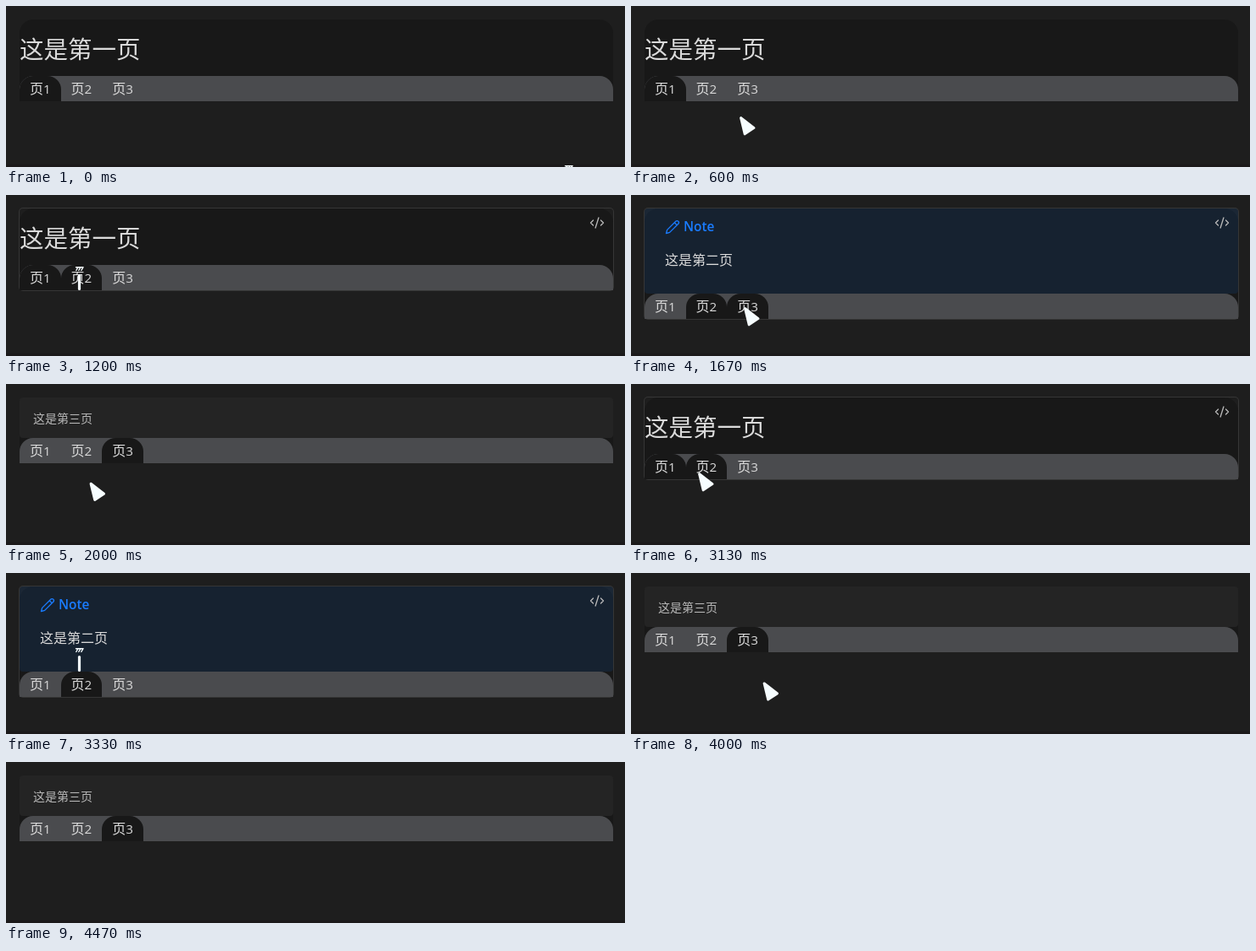
An HTML page for the animation above (5200 ms loop, 730 by 191 pixels).

```html
<!DOCTYPE html>
<html lang="zh-CN">
<head>
<meta charset="utf-8">
<title>Tabs</title>
<style>
  html, body { margin: 0; width: 100%; height: 100%; overflow: hidden; background: #1e1e1e; }
  body {
    position: relative; color: #dadada;
    font: 16px/24px "Open Sans", "Noto Sans CJK SC", "Noto Sans CJK", sans-serif;
  }
  body * { box-sizing: border-box; }
  #floor { position: absolute; left: 0; right: 0; top: 188px; height: 3px; background: #1b191a; }
  #box { position: absolute; left: 16px; top: 16px; width: 700px; border-radius: 4px; }
  #box.hover { box-shadow: 0 0 0 1px #363636; }
  #back { position: absolute; inset: 0; background: #181818; border-radius: 16px 16px 0 0; }
  .page { position: absolute; left: 0; top: 0; width: 100%; white-space: nowrap; }
  .page > * { position: absolute; }
  #p0 { height: 67px; }
  #p0 b { left: 0; top: 15px; font-size: 28.5px; line-height: 40px; font-weight: 500; }
  #p1 { height: 101px; background: rgba(2, 122, 255, .1); border-radius: 4px; }
  #p1 svg { left: 24px; top: 13px; }
  #p1 b { left: 46px; top: 10px; font-size: 15.4px; font-weight: 600; color: #1a7cff; }
  #p1 span { left: 24px; top: 49px; }
  #p2 { height: 48px; background: #242424; border-radius: 4px; }
  #p2 span { left: 16px; top: 13px; font-size: 14px; font-weight: 300; color: #b8b8b8; }
  #bar {
    position: absolute; left: 0; bottom: 0; width: 100%; height: 30px;
    background: #4a4b4e; border-radius: 16px 16px 0 0; overflow: hidden;
  }
  .tab {
    position: absolute; top: 0; width: 48.6px; height: 30px; padding-left: 12px;
    line-height: 30px; font-size: 16px; white-space: nowrap; border-radius: 16px 16px 0 0;
  }
  .tab i { font-style: normal; font-size: 15.2px; }
  .tab.on { background: #181818; }
  #code { position: absolute; right: 10px; top: 8px; }
  svg { display: block; fill: none; stroke-linecap: round; stroke-linejoin: round; }
  #mouse { position: absolute; left: 0; top: 0; width: 100%; height: 100%; }
</style>
</head>
<body>
<div id="floor"></div>
<div id="box">
  <div id="back"></div>
  <div class="page" id="p0"><b>这是第一页</b></div>
  <div class="page" id="p1">
    <svg width="18" height="18" viewBox="0 0 24 24" stroke="#1a7cff" stroke-width="1.75">
      <path d="M17 3a2.8 2.8 0 1 1 4 4L7.500 20.500 2 22l1.500-5.500ZM15 5l4 4"/>
    </svg>
    <b>Note</b><span>这是第二页</span>
  </div>
  <div class="page" id="p2"><span>这是第三页</span></div>
  <div id="bar"></div>
  <svg id="code" width="18" height="18" viewBox="0 0 24 24" stroke="#bababa" stroke-width="1.75">
    <path d="M18 16l4-4-4-4M6 8l-4 4 4 4M14.500 4l-5 16"/>
  </svg>
</div>
<svg id="mouse" viewBox="0 0 730 191">
  <path id="arrow" d="M1.600 1.600L17 13.600 6.200 20.800Z" fill="#f6fdff" stroke="#f6fdff" stroke-width="3"/>
  <g id="beam" stroke="#f6fdff">
    <path d="M7.500-5.500V10.500" stroke-width="3.200"/>
    <path d="M3.500-15.300H12M6-15.300L3.800-11.500M9-15.300L6.800-11.500M12-15.300L9.800-11.500" stroke-width="1.400"/>
  </g>
</svg>
<script>
  const LOOP = 5200, FPS = 15, TAB = 48.6;
  const $ = id => document.getElementById(id);
  const smooth = u => u * u * (3 - 2 * u);
  const linear = u => u;

  // pointer stops: step, x, y, easing towards the stop
  const stops = [
    [2, 656, 205], [9, 128, 131, smooth],
    [10, 128, 131], [16, 79, 101, smooth],
    [18, 79, 101], [25, 133, 133, smooth],
    [27, 133, 133], [35, 41, 89.5, linear], [38, 44, 85, smooth],
    [41, 44, 85], [47, 79, 105, smooth],
    [50, 79, 105], [56, 133, 125, smooth],
    [59, 133, 125], [67, 656, 225, smooth]
  ];
  // step, page shown from then on
  const views = [[0, 0], [19, 1], [28, 2], [42, 0], [50, 1], [60, 2]];
  const heights = [67, 101, 48];
  const PRESS = 18;

  const tabs = [1, 2, 3].map((n, i) => {
    const tab = document.createElement('div');
    tab.className = 'tab';
    tab.style.left = i * TAB + 'px';
    tab.innerHTML = `页<i>${n}</i>`;
    $('bar').append(tab);
    return tab;
  });

  function pointer(k) {
    const next = stops.findIndex(s => s[0] >= k);
    if (next < 0) return stops[stops.length - 1].slice(1, 3);
    if (next === 0) return stops[0].slice(1, 3);
    const [k0, x0, y0] = stops[next - 1];
    const [k1, x1, y1, ease = linear] = stops[next];
    const u = ease((k - k0) / (k1 - k0));
    return [x0 + (x1 - x0) * u, y0 + (y1 - y0) * u];
  }

  const show = (el, on) => { el.style.display = on ? '' : 'none'; };

  function draw(k) {
    const page = views.filter(v => v[0] <= k).pop()[1];
    const barTop = 16 + heights[page], bottom = barTop + 30;
    const [x, y] = pointer(k);
    // hover styles trail the pointer by one step
    const [hx, hy] = pointer(k - 1);
    const hover = hx > 16 && hx < 716 && hy > 16 && hy < bottom;
    const over = hover && hy >= barTop ? Math.floor((hx - 16) / TAB) : -1;

    $('box').style.height = heights[page] + 30 + 'px';
    $('box').classList.toggle('hover', hover);
    show($('code'), hover);
    heights.forEach((_, i) => show($('p' + i), i === page));
    tabs.forEach((tab, i) => tab.classList.toggle('on', i === page || i === over));

    const text = y < barTop || y > 170 || k === PRESS;
    const place = `translate(${x.toFixed(1)} ${y.toFixed(1)})`;
    for (const [id, on] of [['arrow', !text], ['beam', text]]) {
      show($(id), on);
      $(id).setAttribute('transform', place);
    }
  }

  const start = performance.now();
  function tick(now) {
    const t = Math.max(0, now - start) % LOOP;
    draw(Math.min(77, Math.floor(t * FPS / 1000 + 0.06)));
    requestAnimationFrame(tick);
  }
  draw(0);
  requestAnimationFrame(tick);
</script>
</body>
</html>
```
